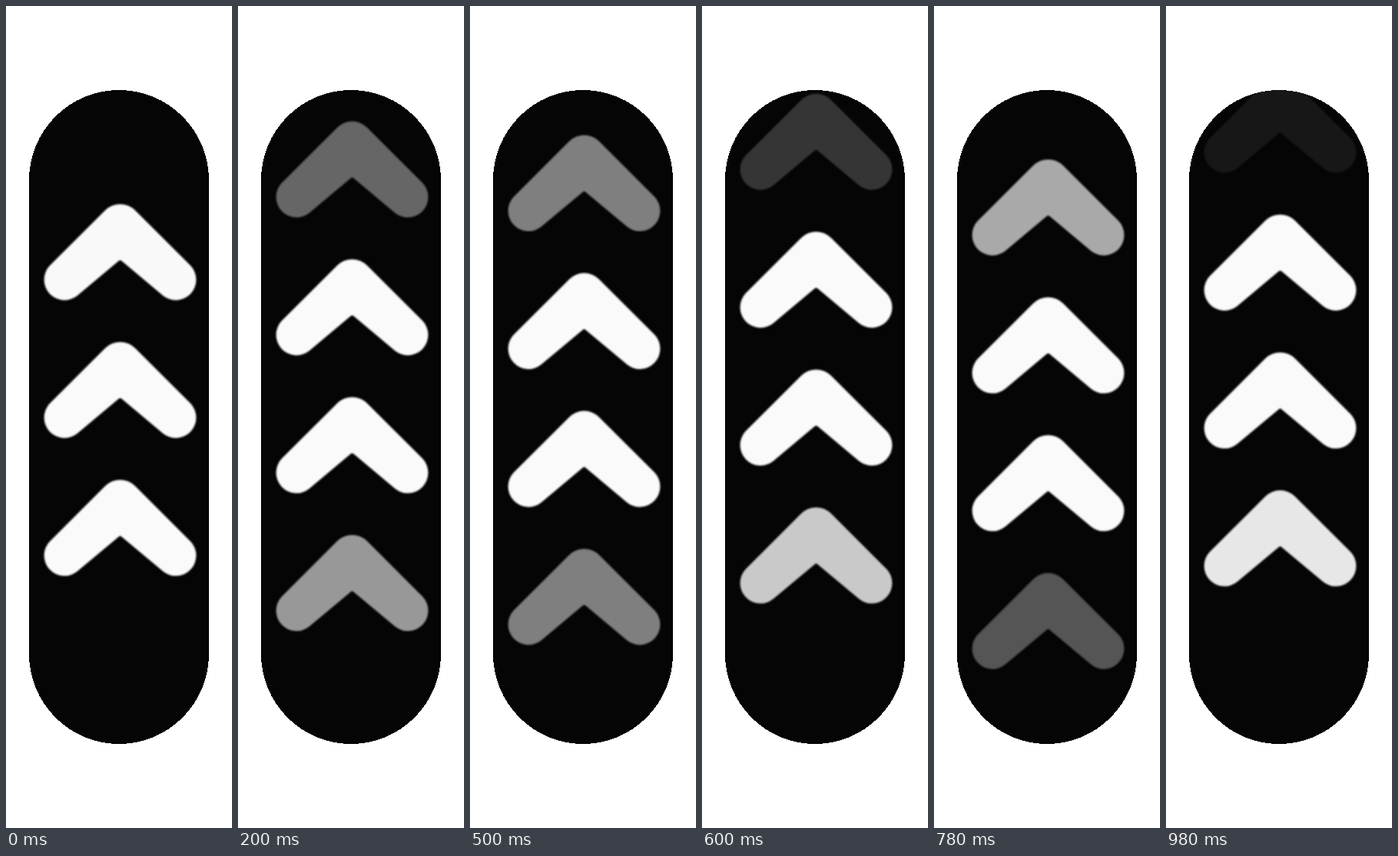
Write an HTML page that moves like this. It is 294x1066 px and loops after 1 s.

```html
<!DOCTYPE html>
<html lang="en">
<head>
<meta charset="utf-8">
<title>Rising chevrons</title>
<style>
  html, body { margin: 0; width: 100%; height: 100%; overflow: hidden; background: #fff; }
  svg { display: block; }
  #arrows { fill: #fafafa; filter: blur(1.2px); }
</style>
</head>
<body>
<svg width="294" height="1066" viewBox="0 0 294 1066">
  <defs>
    <clipPath id="pill"><rect x="30" y="109" width="234" height="848" rx="117"/></clipPath>
    <path id="chevron" d="M56.8 79.8 L129 8 A27.5 27.5 0 0 1 168 8 L240.2 79.8
      A26.5 26.5 0 0 1 204.4 118.7 L150 73.3 Q148.5 72 147 73.3 L92.6 118.7
      A26.5 26.5 0 0 1 56.8 79.8 Z"/>
  </defs>
  <rect x="30" y="109" width="234" height="848" rx="117" fill="#050505" shape-rendering="crispEdges"/>
  <g clip-path="url(#pill)">
    <g id="arrows">
      <use href="#chevron"/><use href="#chevron"/><use href="#chevron"/><use href="#chevron"/>
    </g>
  </g>
</svg>
<script>
  const LOOP = 1000, GAP = 178.8, TOP = 78.7;
  const arrows = document.querySelectorAll('#arrows use');
  const start = performance.now();

  // Three gaps per loop, with a slight lag that is caught up every 100 ms.
  function travel(t) {
    const u = t % 100;
    return 3 * GAP * t / LOOP - 3 * Math.min(u / 80, (100 - u) / 20);
  }

  function draw(now) {
    const t = Math.max(0, now - start) % LOOP;
    const shift = (4 * GAP - travel(t)) % GAP;
    const fade = shift / GAP;
    arrows.forEach((arrow, i) => {
      arrow.setAttribute('transform', `translate(0 ${TOP + shift + i * GAP})`);
      arrow.setAttribute('opacity', i === 0 ? fade : i === 3 ? 1 - fade : 1);
    });
    requestAnimationFrame(draw);
  }
  draw(start);
</script>
</body>
</html>
```
